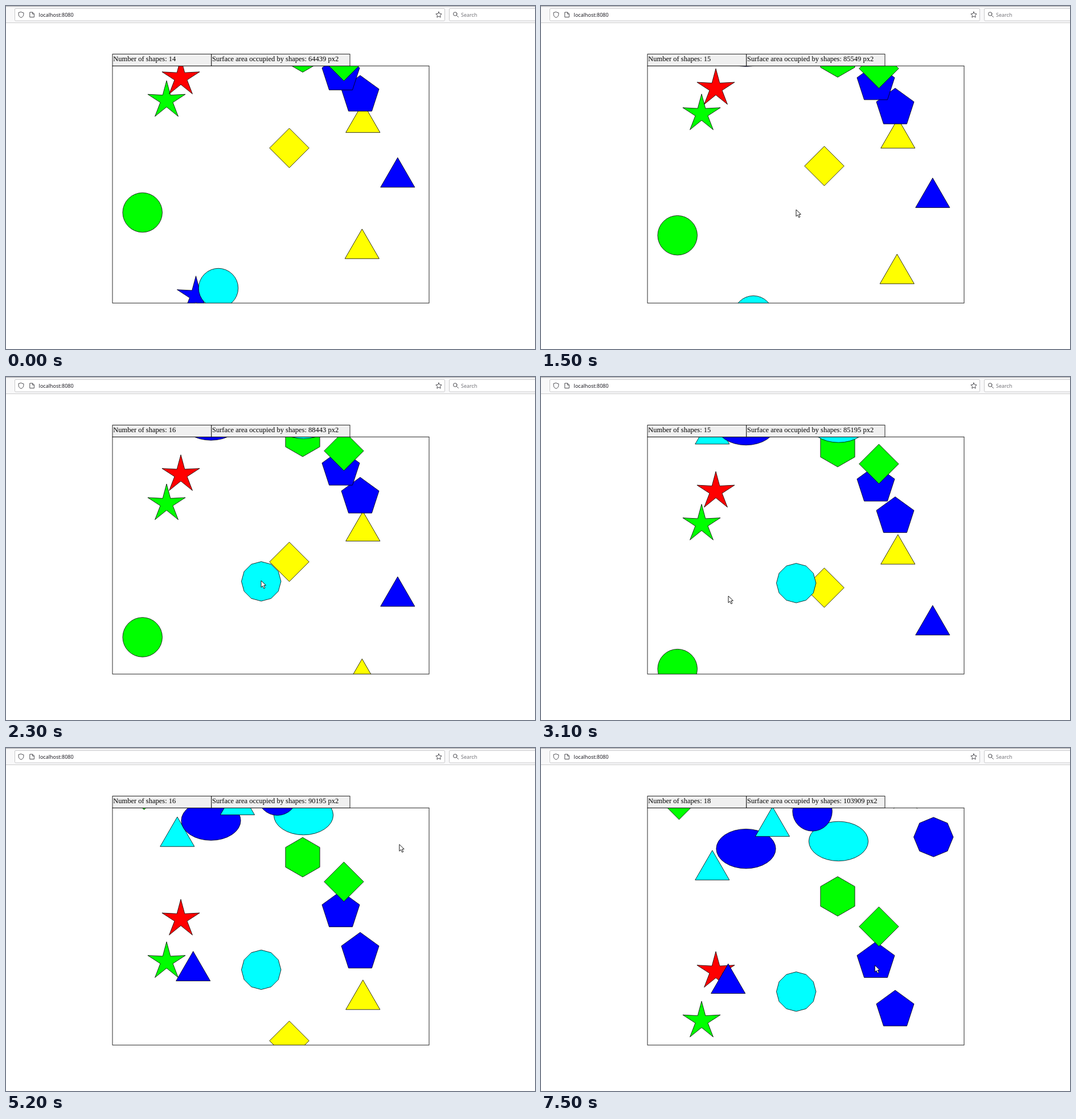
Animation of 929x603 px, one loop 8 s. Source, as an HTML page:

```html
<!DOCTYPE html>
<html lang="en">
<head>
<meta charset="utf-8">
<title>Falling shapes</title>
<style>
  html, body { margin: 0; width: 100%; height: 100%; overflow: hidden; background: #fff; }
  svg { position: absolute; left: 0; top: 0; display: block; }
  .ui { font: 9px "Noto Sans", "Open Sans", sans-serif; }
  .info { font: 12.5px "Liberation Serif", "Times New Roman", serif; fill: #000; }
  .field { fill: #fff; stroke: #c9c9cb; }
  .icon { fill: none; stroke: #4a4a4f; stroke-width: 1; stroke-linejoin: round; stroke-linecap: round; }
  .frame { fill: none; stroke: #000; stroke-width: .85; }
  .cell { fill: #f0f0f0; stroke: #000; stroke-width: .85; }
  #shapes { stroke: #000; stroke-width: .8; }
</style>
</head>
<body>
<svg width="929" height="603" viewBox="0 0 929 603">
  <defs><clipPath id="area"><rect x="187" y="105.3" width="556" height="416.9"/></clipPath></defs>

  <rect width="929" height="29" fill="#f8f8f9"/>
  <rect width="929" height="1.3" fill="#b4b4b6"/>
  <rect y="29" width="929" height="1" fill="#cccccd"/>
  <rect class="field" x="15.5" y="4.5" width="755" height="21.5" rx="1.5"/>
  <rect class="field" x="778.5" y="4.5" width="160" height="21.5" rx="1.5"/>
  <path class="icon" d="M26.5 10.6 L30.9 12 V14.6 C30.9 17.6 29 19.4 26.5 20.4 C24 19.4 22.1 17.6 22.1 14.6 V12 Z"/>
  <path class="icon" d="M42.2 11 H46.6 L49.4 13.8 V19.6 H42.2 Z M46.4 11.2 V14 H49.2"/>
  <polygon class="icon" id="mark" transform="translate(760 15.6)"/>
  <g class="icon"><circle cx="788.8" cy="14" r="3.2"/><path d="M791.3 16.5 L794.4 19.6"/></g>
  <text class="ui" x="57.6" y="18.6" fill="#1c1b22">localhost:8080</text>
  <text class="ui" x="799" y="18.6" fill="#747479">Search</text>

  <g id="shapes" clip-path="url(#area)"></g>
  <rect class="frame" x="187" y="105.3" width="556" height="416.9"/>
  <rect class="cell" x="187" y="84.6" width="173.8" height="20.7"/>
  <rect class="cell" x="360.8" y="84.6" width="243.2" height="20.7"/>
  <text class="info" id="count" x="188.2" y="97.4"></text>
  <text class="info" id="total" x="362" y="97.4"></text>

  <path id="cursor" fill="#fff" stroke="#000" stroke-width=".9" stroke-linejoin="round"
        d="M0 0 V11.8 L2.7 9.3 L4.8 13.8 L6.9 12.8 L4.8 8.5 L8.4 8.2 Z"/>
</svg>
<script>
const LOOP = 8000, R = 34.75, GRAVITY = 0.032, SPAWN_Y = 70.6, FLOOR = 521.8;
const RADIUS = 50, STAR = 0.3337, WIDE = 1.5; // world radius, star notch, ellipse ratio
const RED = '#f00', GREEN = '#0f0', BLUE = '#00f', YELLOW = '#ff0', CYAN = '#0ff';
const $ = id => document.getElementById(id);

// Kind (a number is the sides of a polygon), colour, x, spawn tick, y if clicked.
const shapes = [
  ['star', BLUE, 333.5, -139.1],
  ['circle', CYAN, 373, -137.3],
  [3, YELLOW, 625.3, -127.5],
  ['circle', GREEN, 239.7, -117.6],
  [3, BLUE, 687.8, -106.9],
  [4, YELLOW, 497.5, -96.8],
  [3, YELLOW, 626.8, -86.8],
  ['star', GREEN, 282, -76.6],
  [5, BLUE, 622, -73.9],
  ['star', RED, 307, -63.8],
  [5, BLUE, 588, -61.1],
  [4, GREEN, 593.4, -50.7],
  [6, GREEN, 521, -40.6],
  [3, CYAN, 300.8, -30.6],
  ['ellipse', BLUE, 360, -21.2],
  ['ellipse', CYAN, 522.5, -17.5],
  [12, CYAN, 448.2, -10, 359.1],
  [3, CYAN, 406.5, -9.4],
  ['circle', BLUE, 476.6, 0.8],
  [3, BLUE, 328.7, 6.6, 385.5],
  [4, GREEN, 242.5, 11.2],
  ['star', GREEN, 640, 21.2],
  [8, BLUE, 689.3, 21.3, 149.2],
  [5, BLUE, 560, 26.3],
  [6, RED, 440, 31.4]
];

// Key points: time in ms, then values. The simulation stalls now and then.
const clock = [[0, -22], [100, -20.9], [1200, -18.65], [2300, -7.65], [3100, 0],
  [4200, 12], [5200, 21], [5900, 21.25], [6500, 26.45], [7500, 36.5]];
const pointer = [[1400, 448, 358], [2400, 448, 358], [3000, 329, 385], [4200, 329, 385],
  [5200, 690.8, 169.5], [5600, 689.2, 148.8], [5900, 689.2, 148.8], [6500, 653, 219.3], [7500, 586.3, 382]];

// The picture refreshes every 100 ms in the smooth stretch, elsewhere only at these times.
const refresh = [0, 100, 900, 1200, 3100, 4200, 4700, 5200, 5600, 5900, 6500, 6900, 7500];

function refreshed(t) {
  return t > 1200 && t < 3100 ? Math.floor(t / 100) * 100 : refresh.filter(s => s <= t).pop();
}

function sample(keys, t) {
  const i = keys.findIndex(k => k[0] > t);
  if (i < 1) return keys.at(i).slice(1);
  const a = keys[i - 1], b = keys[i], f = (t - a[0]) / (b[0] - a[0]);
  return a.slice(1).map((v, j) => v + (b[j + 1] - v) * f);
}

function ring(n, radii) {
  return Array.from({ length: n }, (_, i) => {
    const a = i * 2 * Math.PI / n, r = radii[i % radii.length];
    return (r * Math.sin(a)).toFixed(2) + ',' + (-r * Math.cos(a)).toFixed(2);
  }).join(' ');
}

function areaOf(kind) {
  const sq = RADIUS * RADIUS;
  if (kind === 'circle') return Math.PI * sq;
  if (kind === 'ellipse') return Math.PI * sq * WIDE;
  if (kind === 'star') return 5 * sq * STAR * Math.sin(Math.PI / 5);
  return kind / 2 * sq * Math.sin(2 * Math.PI / kind);
}

function make(kind, color) {
  const round = kind === 'circle' || kind === 'ellipse';
  const el = document.createElementNS('http://www.w3.org/2000/svg', round ? 'ellipse' : 'polygon');
  if (round) {
    el.setAttribute('rx', kind === 'circle' ? R : R * WIDE);
    el.setAttribute('ry', R);
  } else {
    el.setAttribute('points', kind === 'star' ? ring(10, [R, R * STAR]) : ring(kind, [R]));
  }
  el.setAttribute('fill', color);
  return $('shapes').appendChild(el);
}

function place(el, x, y, shown) {
  el.setAttribute('visibility', shown ? 'visible' : 'hidden');
  el.setAttribute('transform', `translate(${x.toFixed(2)} ${y.toFixed(2)})`);
}

const bodies = shapes.map(([kind, color, x, born, y0 = SPAWN_Y]) =>
  ({ el: make(kind, color), area: Math.round(areaOf(kind)), x, born, y0 }));
$('mark').setAttribute('points', ring(10, [5.4, 2.6]));

function draw(now) {
  const t = refreshed(now % LOOP), [tick] = sample(clock, t);
  let count = 0, total = 0;
  for (const b of bodies) {
    const age = tick - b.born, y = b.y0 + GRAVITY * age * age;
    const alive = age >= 0 && y - R < FLOOR;
    place(b.el, b.x, y, alive);
    if (alive) { count++; total += b.area; }
  }
  $('count').textContent = 'Number of shapes: ' + count;
  $('total').textContent = `Surface area occupied by shapes: ${total} px2`;
  place($('cursor'), ...sample(pointer, t), t >= pointer[0][0]);
}

const start = performance.now();
function loop() {
  draw(performance.now() - start);
  requestAnimationFrame(loop);
}
loop();
</script>
</body>
</html>
```
